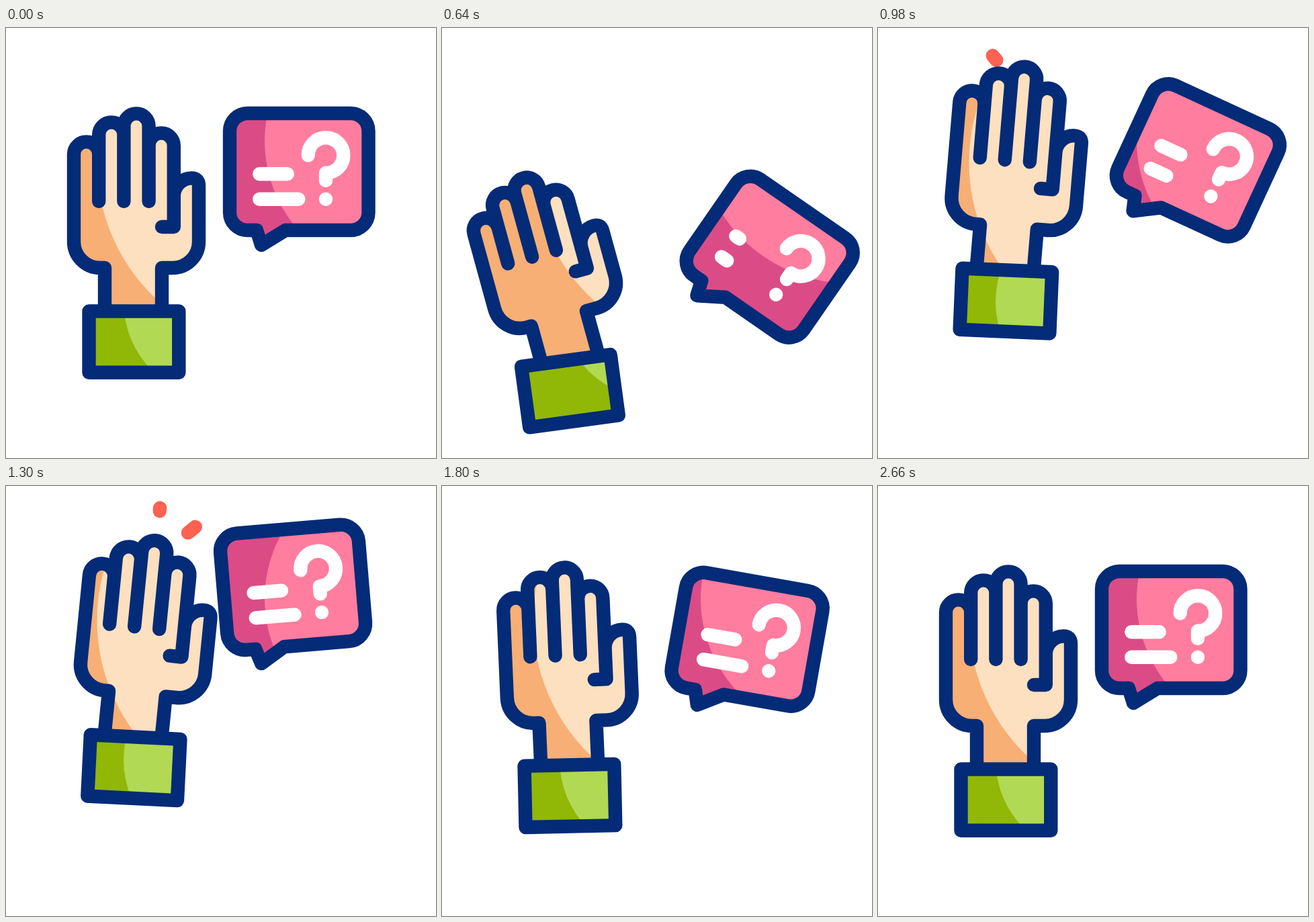
Write an HTML page with a canvas that moves like this. It is 640 by 640 pixels and loops after 2820 ms.

```html
<!DOCTYPE html>
<html lang="en">
<head>
<meta charset="utf-8">
<title>Raised hand with a question</title>
<style>
  html, body { margin: 0; width: 100%; height: 100%; overflow: hidden; background: #fff; }
  canvas { display: block; width: 640px; height: 640px; }
</style>
</head>
<body>
<canvas id="stage" width="640" height="640"></canvas>
<script>
const ctx = document.getElementById('stage').getContext('2d');
const LOOP = 2820, LAG = 50, NAVY = '#042b77', WHITE = '#fff';

const unit = v => Math.min(1, Math.max(0, v));
const ease = u => u * u * (3 - 2 * u);

// Starts at a value, then eases to each pose [from, to, value] in turn.
const track = (start, ...moves) => t => moves.reduce(
  (v, [from, to, value]) => v + (value - v) * ease(unit((t - from) / (to - from))), start);

// Crouch, leap, fall, rebound, settle.
const lift = track(0, [0, 560, 75.5], [610, 1000, -62], [1210, 1570, 26], [1570, 1920, -18], [2005, 2220, 0]);
const lean = track(0, [0, 680, -15.5], [680, 1040, 6.4], [1240, 1620, -4.1], [1620, 2040, 0]);
const swing = track(0, [0, 770, 37.5], [770, 1360, -6], [1360, 1690, 12.9], [1690, 2100, -3.2],
  [2100, 2380, 3.3], [2380, 2640, 0]);
const squash = track(0, [0, 580, 14], [660, 980, -10], [980, 1260, 0]);
const writing = track(1, [0, 560, 0.16], [680, 1140, 1]);

const cuff = new Path2D('M123.5 421.5H257.3V512.8H123.5Z');
const bubble = new Path2D('M360 127H513A26.5 26.5 0 0 1 539.5 153.5V274.5' +
  'A26.5 26.5 0 0 1 513 301H416L380 323L373 301H360' +
  'A26.5 26.5 0 0 1 333 274.5V153.5A26.5 26.5 0 0 1 360 127Z');
const mark = new Path2D('M449.7 189.5A26.3 26.3 0 1 1 476 215.8V227');

// Only the fingertips move with the squash; the palm keeps its shape.
function handPath(s) {
  const fingers = [188, 159, 146, 175].map((y, i) =>
    `V${y + s}A18.6 18.6 0 0 1 ${138.2 + 37.2 * i} ${y + s}V${i < 3 ? 258 : 296}`).join('');
  const top = 223.5 + s;
  return new Path2D(`M147 421V357H140A39 39 0 0 1 101 318${fingers}H232H249.8V${top + 27}` +
    `C249.8 ${top + 12} 262 ${top} 276 ${top}Q287 ${top} 287 ${top + 11}` +
    'V318A39 39 0 0 1 248 357H232V421');
}

function pose(x, y, dy, deg) {
  ctx.setTransform(1, 0, 0, 1, x, y + dy);
  ctx.rotate(deg * Math.PI / 180);
  ctx.translate(-x, -y);
}

function stroke(path, color) {
  ctx.strokeStyle = color;
  ctx.stroke(path);
}

function segment(x0, y0, x1, y1, color) {
  const path = new Path2D();
  path.moveTo(x0, y0);
  path.lineTo(x1, y1);
  stroke(path, color);
}

// Fills the posed shape; the light patch stays still on the stage.
function shade(path, dark, light, cx, cy, rx, ry) {
  ctx.save();
  ctx.clip(path);
  ctx.setTransform(1, 0, 0, 1, 0, 0);
  ctx.fillStyle = dark;
  ctx.fillRect(0, 0, 640, 640);
  ctx.fillStyle = light;
  ctx.beginPath();
  ctx.ellipse(cx, cy, rx, ry, 0, 0, 2 * Math.PI);
  ctx.fill();
  ctx.restore();
  stroke(path, NAVY);
}

// Three rays, 45 degrees apart, each shooting outwards a little later.
function drawSparks(t) {
  for (let i = -1; i <= 1; i++) {
    const age = t - 995 - 85 * i;
    if (age <= 0 || age >= 345) continue;
    const a = i * Math.PI / 4;
    const at = u => [195.8 + (64 + 14 * u) * Math.sin(a), 156.4 - (64 + 14 * u) * Math.cos(a)];
    segment(...at(unit((age - 230) / 115)), ...at(unit(age / 115)), '#ff6152');
  }
}

function drawQuestion(t) {
  segment(377.3, 217.3, 377.3 + 41.5 * writing(t), 217.3, WHITE);
  segment(377.3, 254.7, 377.3 + 58 * writing(t - 120), 254.7, WHITE);
  stroke(mark, WHITE);
  segment(476, 254.7, 476, 254.7, WHITE);
}

function draw(t) {
  ctx.setTransform(1, 0, 0, 1, 0, 0);
  ctx.fillStyle = WHITE;
  ctx.fillRect(0, 0, 640, 640);
  ctx.lineWidth = 20.4;
  ctx.lineCap = ctx.lineJoin = 'round';

  const dy = lift(t), angle = lean(t);
  pose(190.5, 416, dy, angle);
  drawSparks(t);
  shade(handPath(squash(t)), '#f7af75', '#fde0bf', 414, 200, 278.5, 278.5);

  pose(190.5, 467, dy, angle * 0.5);
  shade(cuff, '#91b707', '#b1d953', 320, 407.5, 145, 145);

  pose(380, 322, lift(t - LAG), swing(t));
  shade(bubble, '#db4c86', '#ff7d9f', 613, 168, 228, 213);
  drawQuestion(t);
}

const begin = performance.now();
function tick() {
  draw((performance.now() - begin) % LOOP);
  requestAnimationFrame(tick);
}
tick();
</script>
</body>
</html>
```
